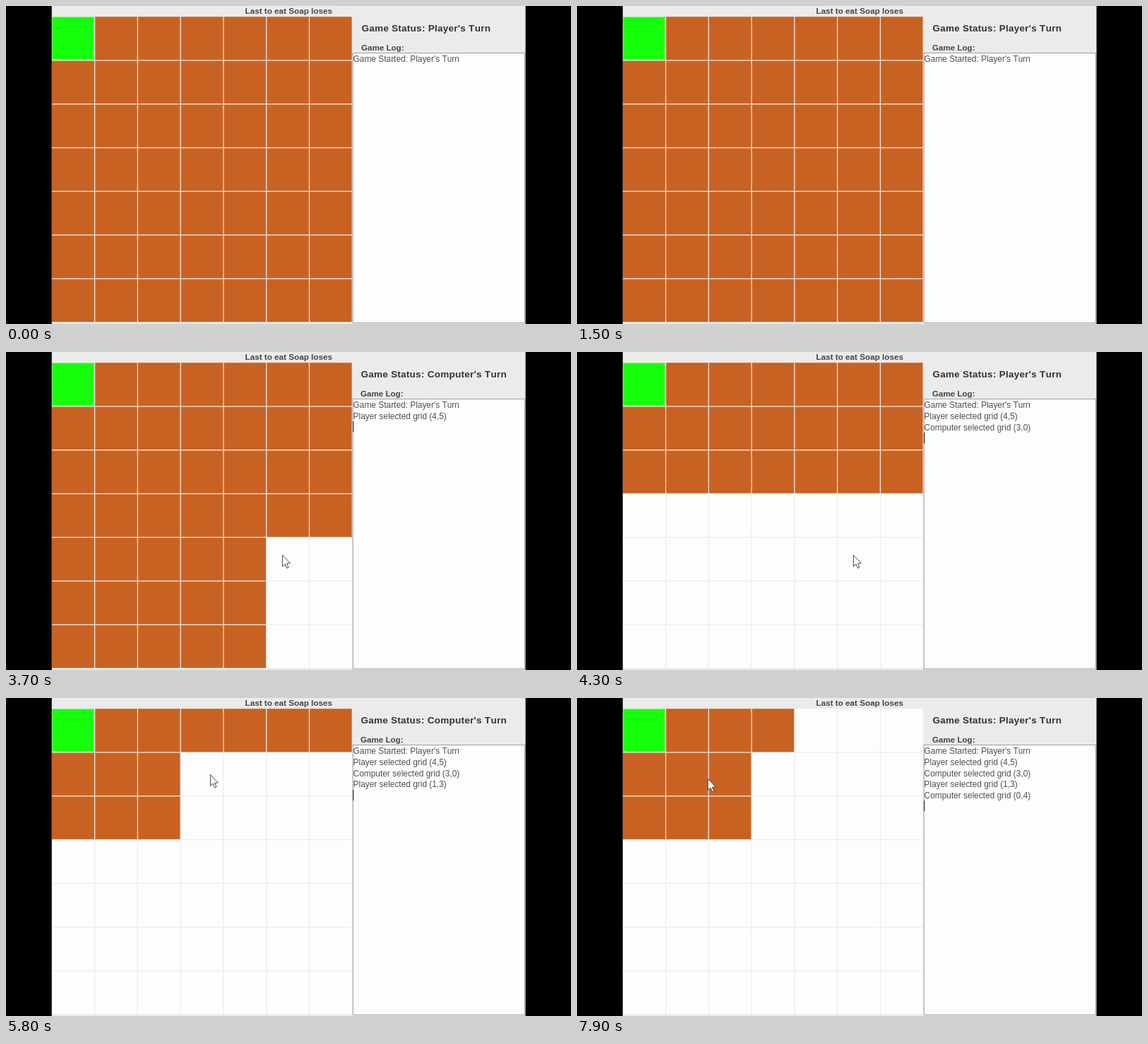
An HTML page with a canvas for the animation above (8 s loop, 800 by 450 pixels).

```html
<!DOCTYPE html>
<html>
<head>
<meta charset="utf-8">
<style>
html, body { margin: 0; width: 100%; height: 100%; overflow: hidden; background: #000; }
canvas { display: block; }
</style>
</head>
<body>
<canvas id="stage" width="800" height="450"></canvas>
<script>
const ctx = document.getElementById('stage').getContext('2d');
ctx.fontKerning = 'none';

const LOOP = 8000, CELL_W = 60.78, CELL_H = 61.78, LEFT = 64.8, TOP = 15.2, LINE = 1.25;
// time, who, row, column
const moves = [
  [3100, 'Player', 4, 5],
  [4100, 'Computer', 3, 0],
  [5700, 'Player', 1, 3],
  [6700, 'Computer', 0, 4]
];
// time, x, y of the pointer tip
const path = [
  [1750, 736, 190], [1900, 598, 196], [2200, 500, 202], [2500, 447, 210.5],
  [2900, 391.4, 287.5], [4700, 391.4, 287.5], [5400, 289.4, 108.5], [7000, 289.4, 108.5],
  [7600, 185.4, 114.5]
];
const arrow = [[0, 0], [0, 16], [3.7, 12.6], [6.2, 18.4], [8.6, 17.3], [6.1, 11.7], [11, 11.5]];

function rect(color, x, y, w, h) {
  ctx.fillStyle = color;
  ctx.fillRect(x, y, w, h);
}

function text(str, x, y, size, color, weight = 'bold', spacing = 0) {
  ctx.font = `${weight} ${size}px "Liberation Sans", Arial, sans-serif`;
  ctx.letterSpacing = spacing + 'px';
  ctx.fillStyle = color;
  ctx.fillText(str, x, y);
}

function drawBoard(done) {
  const edgeX = i => LEFT + i * CELL_W;
  const edgeY = i => TOP + i * CELL_H;
  for (let r = 0; r < 7; r++) {
    for (let c = 0; c < 7; c++) {
      const eaten = done.some(m => r >= m[2] && c >= m[3]);
      const color = eaten ? '#fdfdfe' : r + c ? '#c86222' : '#16ff0a';
      rect(color, edgeX(c), edgeY(r), CELL_W, CELL_H);
    }
  }
  // dotted focus edge of the soap square
  ctx.strokeStyle = '#d8ffd4';
  ctx.lineWidth = 1;
  ctx.setLineDash([1, 1]);
  ctx.strokeRect(65.5, 15.5, 59, 60);
  ctx.setLineDash([]);

  for (let i = 1; i <= 7; i++) {
    rect('#ececec', edgeX(i) - LINE / 2, TOP, LINE, 7 * CELL_H);
    rect('#ececec', LEFT, edgeY(i) - LINE / 2, 7 * CELL_W, LINE);
  }
}

function drawPanel(done, t) {
  const next = done.length % 2 ? 'Computer' : 'Player';
  const x = next === 'Player' ? 503.4 : 502.4;
  text(`Game Status: ${next}'s Turn`, x, 36, 13.5, '#333', 'bold', 0.27);
  text('Game Log:', x - 0.4, 62.5, 11.6, '#444');
  rect('#fdfdfe', 491, 66, 244, 383);
  ctx.strokeStyle = '#95a1af';
  ctx.lineWidth = 1;
  ctx.strokeRect(491.3, 66.5, 243.2, 382);
  const lines = ["Game Started: Player's Turn",
    ...done.map(m => `${m[1]} selected grid (${m[2]},${m[3]})`)];
  lines.forEach((s, i) => text(s, 491.6, 79.3 + i * 15.7, 11.9, '#505050', 'normal'));
  if (t >= 2000) rect('#333', 491, Math.round(82.5 + (lines.length - 1) * 15.7), 1.3, 15);
}

function drawPointer(t) {
  if (t < path[0][0]) return;
  let [, x, y] = path[path.length - 1];
  const i = path.findIndex(p => p[0] > t);
  if (i > 0) {
    const [t0, x0, y0] = path[i - 1], [t1, x1, y1] = path[i];
    const k = (t - t0) / (t1 - t0);
    x = x0 + (x1 - x0) * k;
    y = y0 + (y1 - y0) * k;
  }
  ctx.beginPath();
  arrow.forEach(([dx, dy]) => ctx.lineTo(x + dx, y + dy));
  ctx.closePath();
  ctx.fillStyle = '#fff';
  ctx.fill();
  ctx.strokeStyle = '#444';
  ctx.lineWidth = 1;
  ctx.stroke();
}

function draw(now) {
  const t = now % LOOP;
  const done = moves.filter(m => t >= m[0]);
  rect('#000', 0, 0, 800, 450);
  ctx.save();
  ctx.beginPath();
  ctx.rect(LEFT, 0, 670.8, 450);
  ctx.clip();
  rect('#ebebeb', 64, 0, 673, 450);
  text('Last to eat Soap loses', 338.5, 10.5, 11.7, '#444');
  drawBoard(done);
  drawPanel(done, t);
  drawPointer(t);
  ctx.restore();
}

const start = performance.now();
function tick() {
  draw(performance.now() - start);
  requestAnimationFrame(tick);
}
tick();
</script>
</body>
</html>
```
